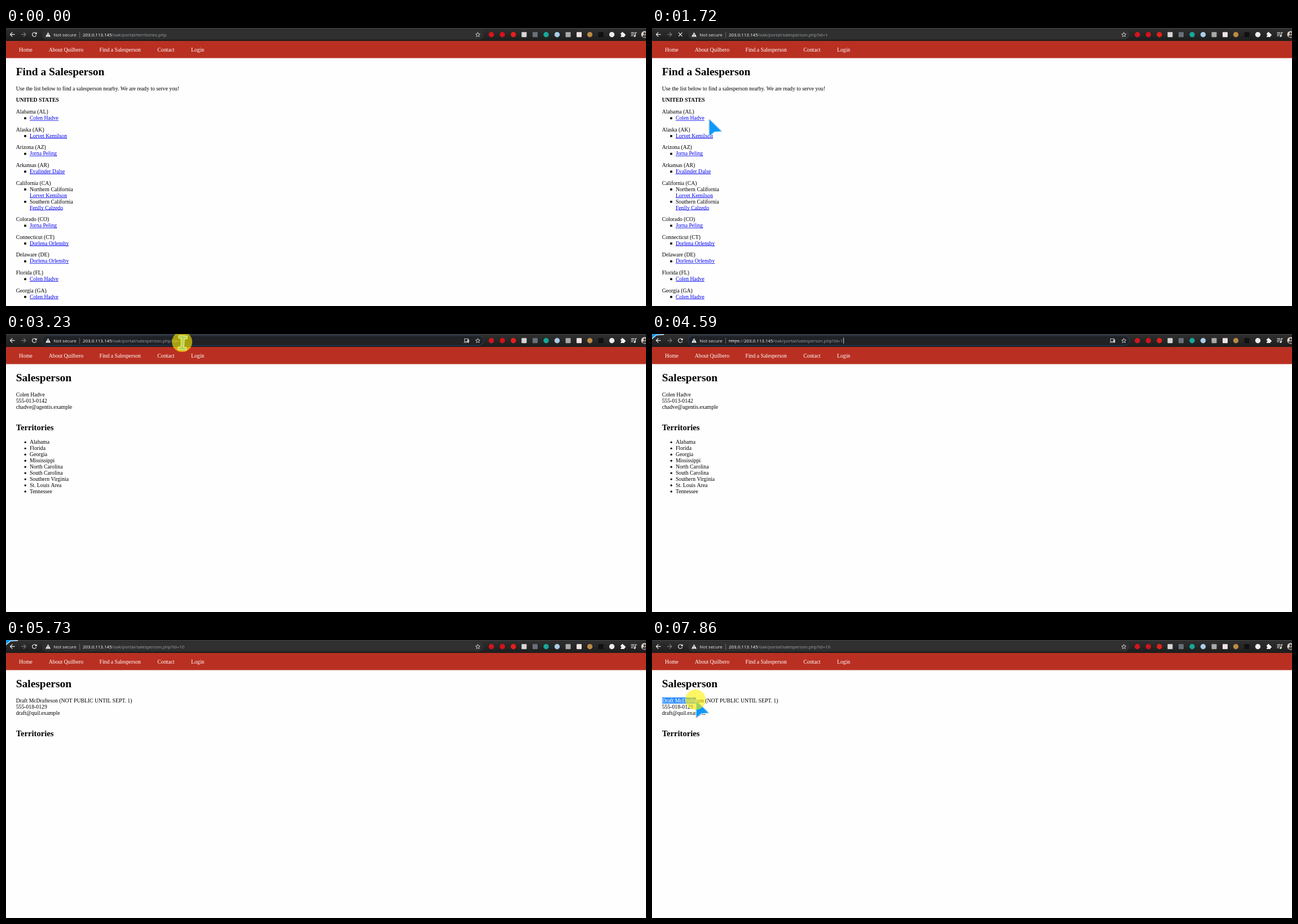
Write an HTML page with a canvas that moves like this. It is 1134 px wide and 494 px high and loops after 7990 ms.

```html
<!DOCTYPE html>
<html lang="en">
<head>
<meta charset="utf-8">
<title>Find a Salesperson</title>
<style>
html, body { margin: 0; width: 1134px; height: 494px; overflow: hidden; background: #fff; }
canvas { display: block; }
</style>
</head>
<body>
<canvas id="stage" width="1134" height="494"></canvas>
<script>
const ctx = document.getElementById('stage').getContext('2d');
const LOOP = 7990;
const SERIF = '"Liberation Serif", "Times New Roman", serif';
const SANS = '"Open Sans", "Noto Sans", sans-serif';
const BODY = `9.73px ${SERIF}`;
const UI = `7.9px ${SANS}`;
const LINE = 10.95, STATE_GAP = 9.73, LEFT = 17.7, INDENT = 41.9;
const HOST = '203.0.113.145', PATH = '/oak/portal/';

const states = [
  ['Alabama (AL)', 'Colen Hadve'],
  ['Alaska (AK)', 'Lorvet Kemilson'],
  ['Arizona (AZ)', 'Jorna Peling'],
  ['Arkansas (AR)', 'Evalinder Dalse'],
  ['California (CA)', 'Lorvet Kemilson', 'Fenlly Calzedo'],
  ['Colorado (CO)', 'Jorna Peling'],
  ['Connecticut (CT)', 'Dorlena Orlensby'],
  ['Delaware (DE)', 'Dorlena Orlensby'],
  ['Florida (FL)', 'Colen Hadve'],
  ['Georgia (GA)', 'Colen Hadve']
];
const people = [
  { lines: ['Colen Hadve', '555-013-0142', 'chadve@agentis.example'],
    areas: ['Alabama', 'Florida', 'Georgia', 'Mississippi', 'North Carolina',
            'South Carolina', 'Southern Virginia', 'St. Louis Area', 'Tennessee'] },
  { lines: ['Draft McDrafteson (NOT PUBLIC UNTIL SEPT. 1)', '555-018-0129', 'draft@quil.example'],
    areas: [] }
];

// Pointer stops: time, x, y, shape
const pointer = [
  [0, -99, -99, 'none'],
  [130, 565, 411, 'arrow'], [250, 330, 350, 'arrow'], [370, 137, 268, 'arrow'],
  [490, 24, 200, 'arrow'], [610, 88, 161, 'arrow'], [870, 98, 162, 'arrow'],
  [1110, 101, 162, 'arrow'],
  [1990, 102, 165, 'arrow'], [2110, 150, 165, 'arrow'], [2230, 205, 165, 'arrow'],
  [2360, 250, 130, 'arrow'], [2480, 285, 85, 'arrow'], [2610, 300, 50, 'arrow'],
  [2730, 306, 20, 'arrow'],
  [2850, 308, 18, 'beam'], [2980, 313, 15, 'beam'], [3490, 335, 15, 'beam'],
  [3730, 358, 15, 'beam'], [4360, 200, 5, 'beam'],
  [4480, 60, -14, 'arrow'], [4590, -2, -21, 'arrow'],
  [6340, -2, -11, 'arrow'], [6720, -1, 41, 'arrow'], [6860, 33, 62, 'arrow'],
  [6980, 22, 98, 'arrow'], [7100, 4, 116, 'arrow'], [7350, 9, 108, 'arrow'],
  [7610, 27, 108, 'arrow'], [7730, 54, 108, 'arrow'], [7860, 78, 108, 'arrow']
];
const clicks = [[1110, 1360], [3230, 3490], [7610, LOOP]];

const within = (t, a, b) => t >= a && t < b;

function text(str, x, y, color = '#000', font = BODY) {
  ctx.font = font;
  ctx.fillStyle = color;
  ctx.fillText(str, x, y);
  return x + ctx.measureText(str).width;
}
function box(x, y, w, h, color, r = 0) {
  ctx.fillStyle = color;
  ctx.beginPath();
  ctx.roundRect(x, y, w, h, r);
  ctx.fill();
}
function dot(x, y, r, color) {
  ctx.fillStyle = color;
  ctx.beginPath();
  ctx.arc(x, y, r, 0, Math.PI * 2);
  ctx.fill();
}
function shape(points, color, fill) {
  ctx.beginPath();
  points.forEach(([x, y]) => ctx.lineTo(x, y));
  if (fill) {
    ctx.closePath();
    ctx.fillStyle = color;
    ctx.fill();
  } else {
    ctx.strokeStyle = color;
    ctx.stroke();
  }
}
function ring(x, y, r, color, from = 0, to = Math.PI * 2) {
  ctx.strokeStyle = color;
  ctx.beginPath();
  ctx.arc(x, y, r, from, to);
  ctx.stroke();
}
function link(str, x, y) {
  const end = text(str, x, y, '#0000ee');
  box(x, y + 0.8, end - x, 0.8, '#0000ee');
}

function drawNav() {
  box(0, 23, 1134, 30.4, '#b93022');
  [['Home', 23], ['About Quilbero', 75.8], ['Find a Salesperson', 165.5],
   ['Contact', 268.3], ['Login', 328]].forEach(([s, x]) => text(s, x, 42, '#fff'));
}

function drawDirectory() {
  text('Find a Salesperson', LEFT, 84, '#000', `bold 19.46px ${SERIF}`);
  text('Use the list below to find a salesperson nearby. We are ready to serve you!', LEFT, 110.8);
  text('UNITED STATES', LEFT, 131.4, '#000', `bold ${BODY}`);
  let y = 152.2;
  for (const [name, ...reps] of states) {
    text(name, LEFT, y);
    reps.forEach((rep, i) => {
      y += LINE;
      box(32.2, y - 4.6, 3.6, 3.6, '#000');
      if (reps.length > 1) {
        text(i ? 'Southern California' : 'Northern California', INDENT, y);
        y += LINE;
      }
      link(rep, INDENT, y);
    });
    y += LINE + STATE_GAP;
  }
}

function drawPerson({ lines, areas }) {
  text('Salesperson', LEFT, 84, '#000', `bold 19.46px ${SERIF}`);
  lines.forEach((s, i) => text(s, LEFT, 110.9 + i * LINE));
  text('Territories', LEFT, 171, '#000', `bold 14.6px ${SERIF}`);
  areas.forEach((s, i) => {
    const y = 195.3 + i * LINE;
    dot(34.2, y - 2.9, 1.7, '#000');
    text(s, INDENT, y);
  });
}

function drawSelection(endX) {
  ctx.save();
  ctx.beginPath();
  ctx.rect(LEFT, 102, endX - LEFT, 11);
  ctx.clip();
  box(LEFT, 102, endX - LEFT, 11, '#3390ff');
  text(people[1].lines[0], LEFT, 110.9, '#fff');
  ctx.restore();
}

function drawButtons(loading) {
  ctx.lineWidth = 1.2;
  shape([[15.5, 11.5], [7.5, 11.5]], '#f1f1f1');
  shape([[11.3, 7.7], [7.5, 11.5], [11.3, 15.3]], '#f1f1f1');
  shape([[27, 11.5], [35, 11.5]], '#7c7c7c');
  shape([[31.2, 7.7], [35, 11.5], [31.2, 15.3]], '#7c7c7c');
  if (loading) {
    shape([[47, 8.2], [53.6, 14.8]], '#f1f1f1');
    shape([[53.6, 8.2], [47, 14.8]], '#f1f1f1');
  } else {
    ring(50.2, 11.6, 3.6, '#f1f1f1', 0.3, 5.5);
    shape([[54.6, 7.3], [54.6, 11], [50.9, 11]], '#f1f1f1', true);
  }
}

function drawStar(x, y) {
  const pts = Array.from({ length: 11 }, (_, i) => {
    const a = i * Math.PI / 5 - Math.PI / 2, r = i % 2 ? 1.9 : 4.2;
    return [x + Math.cos(a) * r, y + Math.sin(a) * r];
  });
  ctx.lineWidth = 0.9;
  shape(pts, '#d8d8d8');
}

function drawExtensions(shieldColor) {
  const round = [[860, shieldColor], [879.5, '#d3121b'], [899, '#e3201d'], [957, '#17a79a'],
                 [976.5, '#a9cbe8'], [1034.5, '#b98a45'], [1073.5, '#ececec']];
  round.forEach(([x, c]) => dot(x, 11.8, 4.7, c));
  const square = [[918, '#d5d5d5'], [937.5, '#68717a'], [996, '#a9a9a9'],
                  [1015.5, '#efe3e3'], [1054, '#111']];
  square.forEach(([x, c]) => box(x - 4.5, 7.3, 9, 9, c, 1));
  // puzzle piece
  box(1089, 9, 7, 7, '#f0f0f0', 1);
  dot(1092.3, 8.6, 1.6, '#f0f0f0');
  dot(1096.2, 12.4, 1.6, '#f0f0f0');
  dot(1089.3, 12.8, 1.2, '#242424');
  // media list
  ctx.lineWidth = 1.1;
  [8.3, 11].forEach(y => shape([[1107.5, y], [1113.5, y]], '#f0f0f0'));
  shape([[1107.5, 13.7], [1111, 13.7]], '#f0f0f0');
  shape([[1117.5, 8.4], [1115.2, 8.4], [1115.2, 14]], '#f0f0f0');
  dot(1113.9, 14.2, 1.6, '#f0f0f0');
  // profile silhouette
  dot(1131.5, 11.5, 6, '#d9d5d0');
  dot(1131.5, 9.6, 2.2, '#4a3d37');
  box(1127.8, 12.4, 7.4, 4.2, '#4a3d37', 2);
}

function drawAddress(t) {
  const open = within(t, 4840, 5340), bare = within(t, 5340, 5600);
  const focused = within(t, 3230, 5340), full = within(t, 3360, 5340);
  if (open) {
    box(60, 1, 790, 22, '#292a2d', 5);
  } else {
    box(64, 3, 782, 17.5, focused ? '#202226' : '#303030', 8.7);
    if (focused) {
      ctx.lineWidth = 1;
      ctx.strokeStyle = '#24405f';
      ctx.stroke();
    }
  }
  let x = 84.3;
  if (bare) {
    ctx.lineWidth = 0.9;
    ring(74.5, 11.8, 3.8, '#f1f1f1');
    box(74, 11, 1, 3, '#f1f1f1');
    box(74, 9.2, 1, 1, '#f1f1f1');
  } else {
    shape([[74.5, 7.6], [79, 15.4], [70, 15.4]], '#f1f1f1', true);
    box(74, 10.2, 1, 2.6, '#303030');
    box(74, 13.5, 1, 1, '#303030');
    text('Not secure', x, 14.7, '#ececec', `8px ${SANS}`);
    box(130, 6.5, 0.8, 10.5, '#77797c');
    x = 136;
  }
  if (full) {
    const end = text('https', x, 14.7, '#c9ccd0', UI);
    box(x, 11.6, end - x, 0.8, '#c9ccd0');
    x = text('://', end, 14.7, '#9aa0a6', UI);
  }
  x = text(HOST, x, 14.7, '#fff', UI);
  const page = t < 1360 ? 'territories.php' : 'salesperson.php?id=' + (t < 4840 ? '1' : '10');
  x = text(PATH + page, x, 14.7, '#9aa0a6', UI);
  if (full) box(x + 0.6, 6.5, 0.8, 10.5, '#fff');

  drawStar(836, 12);
  if (within(t, 2850, 5340)) {
    ctx.lineWidth = 0.9;
    ctx.strokeStyle = '#d0d0d0';
    ctx.strokeRect(812.5, 8.5, 6.5, 5);
    shape([[811, 15], [817, 15]], '#d0d0d0');
    box(817.3, 10, 3.2, 5.4, '#d0d0d0', 0.6);
  }
}

function drawSuggestions(t) {
  const fading = t >= 5340;
  const full = 'https://' + HOST + PATH + 'salesperson.php?id=10';
  const dim = 'rgba(130,22,14,0.45)';
  ctx.save();
  if (!fading) {
    ctx.shadowColor = 'rgba(0,0,0,0.4)';
    ctx.shadowBlur = 10;
    ctx.shadowOffsetY = 3;
  }
  box(60, 23, 790, 50.5, fading ? 'rgba(20,20,20,0.12)' : '#292a2d', [0, 0, 5, 5]);
  ctx.restore();
  if (!fading) box(60, 23, 790, 23, '#3c3d41');

  ctx.lineWidth = 0.9;
  ring(74.5, 34, 3.6, fading ? dim : '#c4c7cb');
  const light = fading ? dim : '#f1f1f1';
  let x = text('Salesperson: ', 91, 37, light, `bold ${UI}`);
  x = text('Draft McDrafteson (NOT ', x, 37, light, UI);
  x = text('PUBLIC', x, 37, light, `bold ${UI}`);
  x = text(' UNTIL SEPT. 1) - ', x, 37, light, UI);
  text(full, x, 37, fading ? dim : '#8ab4f8', UI);
  shape([[835.3, 31.7], [839.9, 36.3]], light);
  shape([[839.9, 31.7], [835.3, 36.3]], light);

  const pale = fading ? 'rgba(255,255,255,0.85)' : '#f1f1f1';
  ring(73.8, 56.6, 2.4, pale);
  shape([[75.6, 58.4], [78, 60.8]], pale);
  x = text(full, 91, 60, pale, UI);
  text(' - Vindor Search', x, 60, fading ? 'rgba(255,255,255,0.6)' : '#9aa0a6', UI);
}

function drawToolbar(t) {
  const grad = ctx.createLinearGradient(0, 0, 0, 23);
  grad.addColorStop(0, '#303030');
  grad.addColorStop(1, '#1d1d1d');
  box(0, 0, 1134, 23, grad);
  box(0, 0, 1134, 0.8, '#4b4b4b');
  drawButtons(within(t, 1360, 1990) || within(t, 5340, 5730));
  drawAddress(t);
  drawExtensions(within(t, 5340, 5730) ? '#9b9b9b' : '#d4151d');
}

function drawPointer(t) {
  const [, x, y, kind] = pointer.findLast(p => p[0] <= t);
  ctx.save();
  ctx.translate(x, y);
  ctx.lineJoin = 'round';
  if (kind === 'arrow') {
    const arrow = [[0.6, 0.5], [22, 21.5], [9.5, 22.3], [0.6, 30], [0.6, 0.5]];
    ctx.lineWidth = 2.6;
    shape(arrow, '#c3c9d2');
    ctx.lineWidth = 1.4;
    shape(arrow, '#f5f8fb');
    shape(arrow, '#0b9afa', true);
  } else if (kind === 'beam') {
    ctx.rotate(0.07);
    const bars = [[-7, -11.5, 14, 4], [-2, -11.5, 4, 24], [-7, 9, 14, 4]];
    bars.forEach(([a, b, w, h]) => box(a - 1.2, b - 1.2, w + 2.4, h + 2.4, '#f5f8fb', 2));
    bars.forEach(([a, b, w, h]) => box(a, b, w, h, '#3fa9ee', 1));
  }
  ctx.restore();
  if (clicks.some(([a, b]) => within(t, a, b))) {
    dot(x - 1, y - (kind === 'beam' ? 1 : 2), 18, 'rgba(255,242,0,0.6)');
  }
  return x;
}

function draw(t) {
  box(0, 0, 1134, 494, '#fefefe');
  drawNav();
  if (t < 1850) drawDirectory();
  else drawPerson(people[t < 5600 ? 0 : 1]);
  if (t >= 7610) drawSelection(pointer.findLast(p => p[0] <= t)[1]);
  drawToolbar(t);
  if (within(t, 4840, 5480)) drawSuggestions(t);
  drawPointer(t);
}

const start = performance.now();
function tick(now) {
  draw(Math.max(0, now - start) % LOOP);
  requestAnimationFrame(tick);
}
draw(0);
requestAnimationFrame(tick);
</script>
</body>
</html>
```
